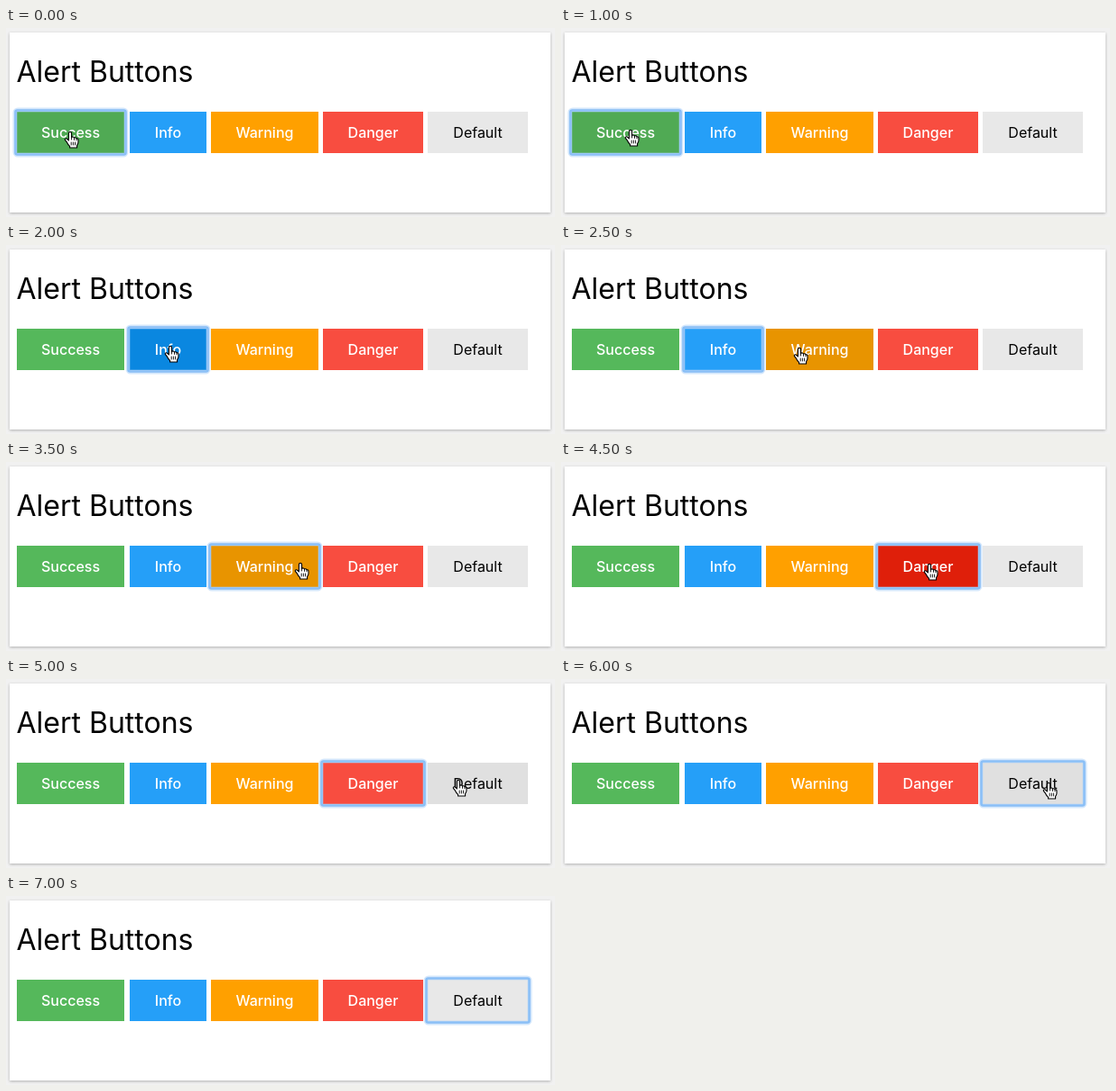
Animation of 608 by 210 pixels, one loop 7500 ms. Source, as an HTML page:

```html
<!DOCTYPE html>
<html lang="en">
<head>
<meta charset="utf-8">
<title>Alert Buttons</title>
<style>
  html, body { margin: 0; width: 100%; height: 100%; overflow: hidden; background: #f1f1f1; }
  #stage { position: relative; width: 608px; height: 210px; overflow: hidden; }
  .card {
    position: absolute; left: 4px; top: 5px; width: 599px; height: 200px;
    background: #fff; box-shadow: 0 1px 3px rgba(0, 0, 0, .28);
  }
  svg { position: absolute; left: 0; top: 0; width: 608px; height: 210px; }
  text { font-family: Inter, "Noto Sans", sans-serif; }
  .title { font-size: 32px; fill: #000; }
  .label { font-size: 16px; font-weight: 500; fill: #fff; text-anchor: middle; }
  .label.dark { font-weight: 400; fill: #000; }
  .ring { fill: none; }
</style>
</head>
<body>
<div id="stage">
  <div class="card"></div>
  <svg viewBox="0 0 608 210">
    <text class="title" x="11.5" y="60">Alert Buttons</text>
    <g id="buttons"></g>
    <g id="ring">
      <rect class="ring" id="glow" y="91" height="50" rx="3" stroke="#a9d0fa" stroke-opacity=".5" stroke-width="5"/>
      <rect class="ring" id="line" y="91.5" height="49" rx="2" stroke="#8abff6" stroke-width="2.6"/>
    </g>
    <g id="hand" stroke="#000" stroke-width="1.1" stroke-linejoin="round" stroke-linecap="round">
      <path fill="#fff" d="M-1.6 10V1.8Q-1.5.4 0 .4T1.6 1.8V6.4Q3.6 5.2 4.5 7
        Q6.3 6.1 7 7.8Q9 7.4 9 9.4V12Q8.8 14 7.6 15.4V18H-.4V16.4
        Q-2.6 14.2-3.4 12.2L-5.6 9.4Q-6 7.6-4.2 7.8Q-2.6 8.6-1.6 10Z"/>
      <path fill="none" stroke-width=".9" d="M1.6 6.4V9M4.5 7V9.4M7 7.8V9.8M1.2 12V15M3.4 12V15M5.6 12V15"/>
    </g>
  </svg>
</div>
<script>
const LOOP = 7500, STEP = 500, NS = "http://www.w3.org/2000/svg";
const $ = id => document.getElementById(id);

// label, left, width, colour, hover colour
const BUTTONS = [
  ["Success", 12, 119, "#55b85b", "#50aa54"],
  ["Info", 137, 85, "#259ff8", "#0a87e0"],
  ["Warning", 227, 119, "#ffa000", "#e89400"],
  ["Danger", 351, 111, "#f84d40", "#df1f0a"],
  ["Default", 467, 111, "#e8e8e8", "#e0e0e0"]
];

// focused button, hovered button, fingertip x, y (no hover: pointer away)
const STEPS = [
  [0, 0, 71, 115], [0, 0, 71, 113], [0, 0, 77, 113],
  [0, 1, 170, 114], [1, 1, 182, 112],
  [1, 2, 264, 114], [1, 2, 302, 113], [2, 2, 326, 112],
  [2, 3, 389, 113], [3, 3, 408, 113],
  [3, 4, 501, 112], [4, 4, 524, 113], [4, 4, 540, 115],
  [4, -1], [4, -1]
];

function add(tag, attrs) {
  const el = document.createElementNS(NS, tag);
  for (const key in attrs) el.setAttribute(key, attrs[key]);
  return $("buttons").appendChild(el);
}

const faces = BUTTONS.map(([name, x, width, fill], i) => {
  const face = add("rect", { x, y: 93, width, height: 46, fill });
  add("text", { x: x + width / 2, y: 122, class: i === 4 ? "label dark" : "label" }).textContent = name;
  return face;
});

let shown = -1;
function draw(step) {
  const [focus, hover, px, py] = STEPS[step];
  faces.forEach((face, i) => face.setAttribute("fill", BUTTONS[i][i === hover ? 4 : 3]));

  const [, x, width] = BUTTONS[focus];
  $("glow").setAttribute("x", x - 2);
  $("glow").setAttribute("width", width + 4);
  $("line").setAttribute("x", x - 1.5);
  $("line").setAttribute("width", width + 3);

  const hand = $("hand");
  hand.style.display = hover < 0 ? "none" : "";
  if (hover >= 0) hand.setAttribute("transform", `translate(${px} ${py})`);
}

function tick() {
  const step = Math.floor((performance.now() % LOOP) / STEP);
  if (step !== shown) draw(shown = step);
  requestAnimationFrame(tick);
}
tick();
</script>
</body>
</html>
```
